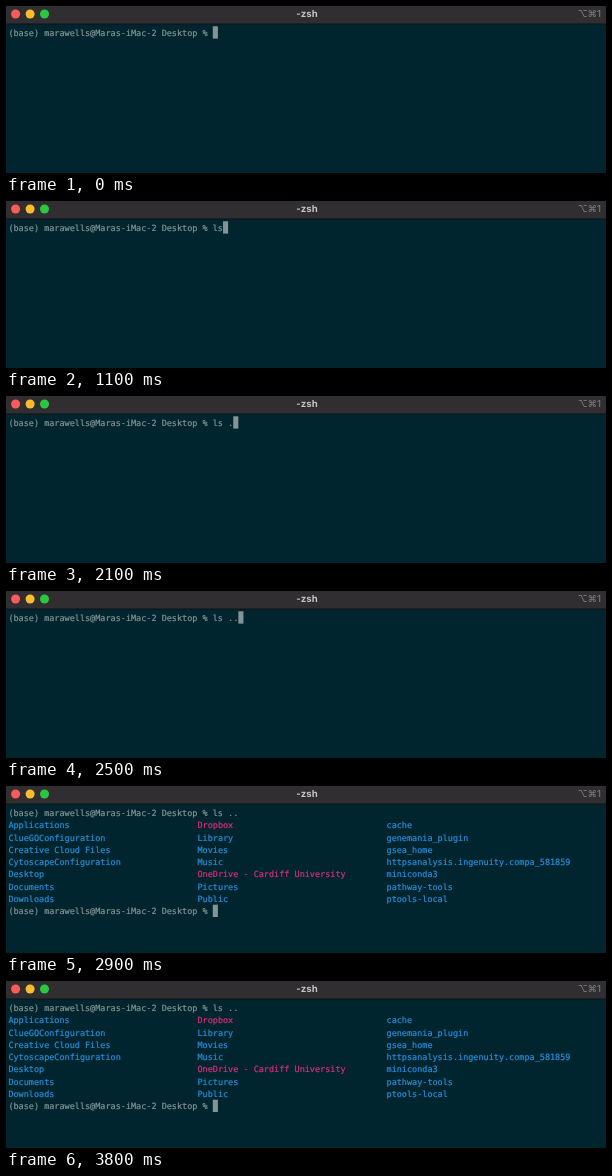
An HTML page that plays this animation: 600 px wide and 167 px high, repeating every 3900 ms.

```html
<!DOCTYPE html>
<html lang="en">
<head>
<meta charset="utf-8">
<title>Terminal: ls ..</title>
<style>
  html, body { margin: 0; height: 100%; overflow: hidden; background: #00252e; }
  svg { display: block; width: 100vw; height: 100vh; }
  text { white-space: pre; text-rendering: geometricPrecision; }
  #screen { font: 8.49px "DejaVu Sans Mono", monospace; color: #839496; }
  #screen text { fill: currentColor; stroke: currentColor; stroke-width: 0.2px; }
  #screen .dir { color: #268fdb; }
  #screen .link { color: #dc2b82; }
  #cursor { fill: currentColor; }
  .title { font: 700 9.6px Inter, sans-serif; fill: #c6c4c5; text-anchor: middle; }
  .shortcut { font: 500 9.6px Inter, sans-serif; fill: #7b797b; text-anchor: end; }
</style>
</head>
<body>
<svg viewBox="0 0 600 167">
  <rect width="600" height="167" fill="#00252e"/>
  <rect width="600" height="18" fill="#302e30"/>
  <rect y="17.5" width="600" height="1" fill="#0c1417"/>
  <circle cx="9.6" cy="8" r="4.5" fill="#fc5b57"/>
  <circle cx="24.1" cy="8" r="4.5" fill="#fdbc2e"/>
  <circle cx="38.5" cy="8" r="4.5" fill="#2ac840"/>
  <text class="title" x="301" y="11">-zsh</text>
  <text class="shortcut" x="595" y="10.8">⌥⌘1</text>
  <g id="screen">
    <g id="listing"></g>
    <rect id="cursor" width="5.1" height="12.3"/>
  </g>
</svg>
<script>
const LOOP = 3900, OUTPUT_AT = 2900;
const KEY_TIMES = [700, 1100, 1600, 2100, 2500];
const COMMAND = "ls ..";
const PROMPT = "(base) marawells@Maras-iMac-2 Desktop % ";
const COLUMN_WIDTH = 37;
const COLUMNS = [
  ["Applications", "ClueGOConfiguration", "Creative Cloud Files", "CytoscapeConfiguration",
   "Desktop", "Documents", "Downloads"],
  ["Dropbox", "Library", "Movies", "Music", "OneDrive - Cardiff University", "Pictures", "Public"],
  ["cache", "genemania_plugin", "gsea_home", "httpsanalysis.ingenuity.compa_581859",
   "miniconda3", "pathway-tools", "ptools-local"]
];
const LINKS = ["Dropbox", "OneDrive - Cardiff University"];

const colX = col => 2.4 + col * 5.11;
const rowY = row => 20.3 + row * 12.3;
const screen = document.getElementById("screen");
const listing = document.getElementById("listing");
const cursor = document.getElementById("cursor");

function print(parent, col, row, string, style = "") {
  const text = document.createElementNS("http://www.w3.org/2000/svg", "text");
  text.setAttribute("x", colX(col));
  text.setAttribute("y", rowY(row) + 9.6);
  text.setAttribute("class", style);
  text.textContent = string;
  parent.append(text);
  return text;
}

const commandLine = print(screen, 0, 0, PROMPT);
COLUMNS.forEach((names, c) => names.forEach((name, r) =>
  print(listing, c * COLUMN_WIDTH, r + 1, name, LINKS.includes(name) ? "link" : "dir")));
print(listing, 0, 8, PROMPT);

function draw(now) {
  const t = now % LOOP;
  const typed = KEY_TIMES.filter(time => time <= t).length;
  const done = t >= OUTPUT_AT;
  commandLine.textContent = PROMPT + COMMAND.slice(0, typed);
  listing.setAttribute("visibility", done ? "visible" : "hidden");
  cursor.setAttribute("x", colX(PROMPT.length + (done ? 0 : typed)));
  cursor.setAttribute("y", rowY(done ? 8 : 0));
}

const start = performance.now();
function tick() {
  draw(performance.now() - start);
  requestAnimationFrame(tick);
}
tick();
</script>
</body>
</html>
```
